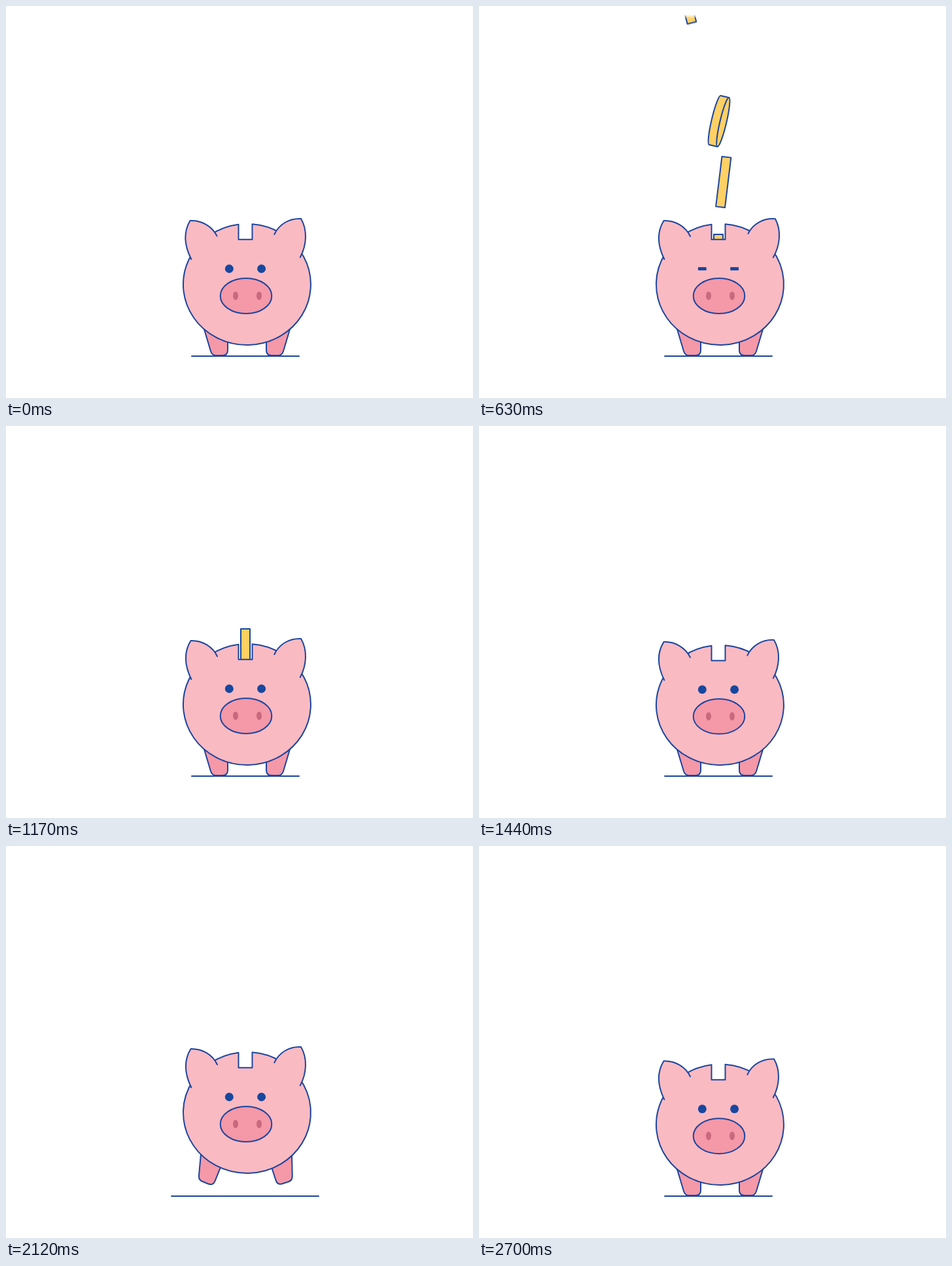
Write an HTML page that moves like this. It is 714 by 599 pixels and loops after 3.27 s.

```html
<!DOCTYPE html>
<html lang="en">
<head>
<meta charset="utf-8">
<title>Piggy bank</title>
<style>
  html, body { margin: 0; width: 100%; height: 100%; overflow: hidden; background: #fff; }
  svg { display: block; width: 100vw; height: 100vh; }
  .ink { stroke: #1c459d; stroke-width: 2; stroke-linejoin: round; stroke-linecap: round; }
  .ink, .ink * { vector-effect: non-scaling-stroke; }
  .skin { fill: #fabac2; }
  .deep { fill: #f598a8; }
  .gold { fill: #ffd064; }
</style>
</head>
<body>
<svg viewBox="0 0 714 599">
  <defs>
    <linearGradient id="fade" gradientUnits="userSpaceOnUse" x1="0" y1="13" x2="0" y2="19">
      <stop offset="0" stop-color="#000"/>
      <stop offset="1" stop-color="#fff"/>
    </linearGradient>
    <mask id="sky" maskUnits="userSpaceOnUse" x="0" y="0" width="714" height="599">
      <rect width="714" height="599" fill="url(#fade)"/>
    </mask>
    <clipPath id="lids"><rect id="lid" x="320" width="90"/></clipPath>
  </defs>

  <g id="coins" class="ink gold" mask="url(#sky)">
    <path d="M-7-38.5H7V38.5H-7Z"/>
    <path d="M-7-38.5H7V38.5H-7Z"/>
    <g>
      <path d="M6.5-38.5H-6.5A5 38.5 0 0 0-6.5 38.5H6.5A5 38.5 0 0 0 6.5-38.5Z"/>
      <path fill="none" d="M6.5-38.5A5 38.5 0 0 0 6.5 38.5"/>
    </g>
    <path d="M-7-38.5H7V38.5H-7Z"/>
  </g>

  <g id="pig">
    <g class="ink">
      <path id="legL" class="deep" d="M294 464L313 527.5Q315 534 321 534H331Q339 534 339 526V464Z"/>
      <path id="legR" class="deep" d="M443 464L424 527.5Q422 534 416 534H406Q398 534 398 526V464Z"/>
      <path class="skin" d="M376.5 333.3A97.5 92.5 0 1 1 355.5 333.8V356.8H376.5Z"/>
      <path id="earL" class="skin" d="M283.3 387C273 366 272 345 282.5 328C300 327.5 316 337 323 352"/>
      <path id="earR" class="skin" d="M410.3 349C417 334 433 324 451 325C461 342 460 365 449.8 384"/>
      <ellipse class="deep" cx="367" cy="443" rx="39.3" ry="27"/>
    </g>
    <g fill="#c9697e">
      <ellipse cx="351" cy="442.8" rx="4" ry="6.4"/>
      <ellipse cx="387" cy="442.8" rx="4" ry="6.4"/>
    </g>
    <g fill="#17479e" clip-path="url(#lids)">
      <circle cx="341.3" cy="401.5" r="6.5"/>
      <circle cx="390.6" cy="401.5" r="6.5"/>
    </g>
  </g>
  <path id="ground" class="ink" fill="none"/>
</svg>
<script>
const LOOP = 3270, STEP = 30, FALL = 2 / 3;
const $ = id => document.getElementById(id);
const clamp = (v, a = 0, b = 1) => Math.min(b, Math.max(a, v));
const span = (t, a, b) => clamp((t - a) / (b - a));
const smooth = u => u * u * (3 - 2 * u);
const hump = (t, a, b) => Math.sin(Math.PI * span(t, a, b));
const gate = (t, a, b, c, d) => smooth(span(t, a, b)) * (1 - smooth(span(t, c, d)));
const toward = (v, end, change) =>
  change < 0 ? Math.max(end, v + change) : Math.min(end, v + change);
const move = (el, value) => el.setAttribute('transform', value);

// Position and tilt at time `at`, with drift and turn per ms until centred over the slot.
const coins = [
  { at: 240, x: 366, y: 127.5, tilt: 0, drift: 0, turn: 0 },
  { at: 240, x: 426, y: 9, tilt: 21, drift: -0.134, turn: -0.036 },
  { at: 630, x: 367, y: 176, tilt: 13.3, drift: 0, turn: 0 },
  { at: 630, x: 315.8, y: -11.5, tilt: -14.5, drift: 0.122, turn: 0.046 }
];
const coinEls = [...$('coins').children];
const landings = [645, 822, 960, 1242];

function drawCoin(c, i, t) {
  const d = t - c.at, y = c.y + d * FALL;
  const x = c.drift ? toward(c.x, 366, c.drift * d) : c.x;
  const tilt = c.turn ? toward(c.tilt, 0, c.turn * d) : c.tilt;
  coinEls[i].style.display = y > -45 && y < 450 ? '' : 'none';
  move(coinEls[i], `translate(${x} ${y}) rotate(${tilt})`);
}

function draw(t) {
  coins.forEach((c, i) => drawCoin(c, i, t));

  const gulp = Math.max(...landings.map(s => hump(t, s, s + 198)));
  const land = Math.sin(Math.PI * Math.sqrt(span(t, 2340, 2700)));
  const press = 0.058 * gulp + 0.045 * hump(t, 1910, 2030) + 0.05 * land;

  const u = span(t, 2030, 2344) * 2 - 1;
  const lift = 22 * (1 - u * u);
  move($('pig'), `translate(0 ${534 * press - lift}) scale(1 ${1 - press})`);

  const swing = lift / 18;
  move($('legL'), `rotate(${22 * swing} 319.6 478)`);
  move($('legR'), `rotate(${-18 * swing} 414.5 481.5)`);

  const left = 1 - span(t, 480, 600) + 7 * hump(t, 270, 600);
  const right = 8 * hump(t, 330, 655);
  move($('earL'), `rotate(${-left} 285 386)`);
  move($('earR'), `rotate(${right} 445 384)`);

  const half = 7 - 4.5 * gate(t, 500, 580, 660, 740);
  $('lid').setAttribute('y', 401.5 - half);
  $('lid').setAttribute('height', 2 * half);

  const wide = gate(t, 1930, 2110, 2250, 2450);
  $('ground').setAttribute('d', `M${284 - 31 * wide} 535H${448 + 30 * wide}`);
}

const start = performance.now();
function tick() {
  const t = (performance.now() - start) % LOOP;
  const base = t < 1440 ? 0 : 1940 % STEP;
  draw(base + Math.floor((t - base) / STEP) * STEP);
  requestAnimationFrame(tick);
}
tick();
</script>
</body>
</html>
```
